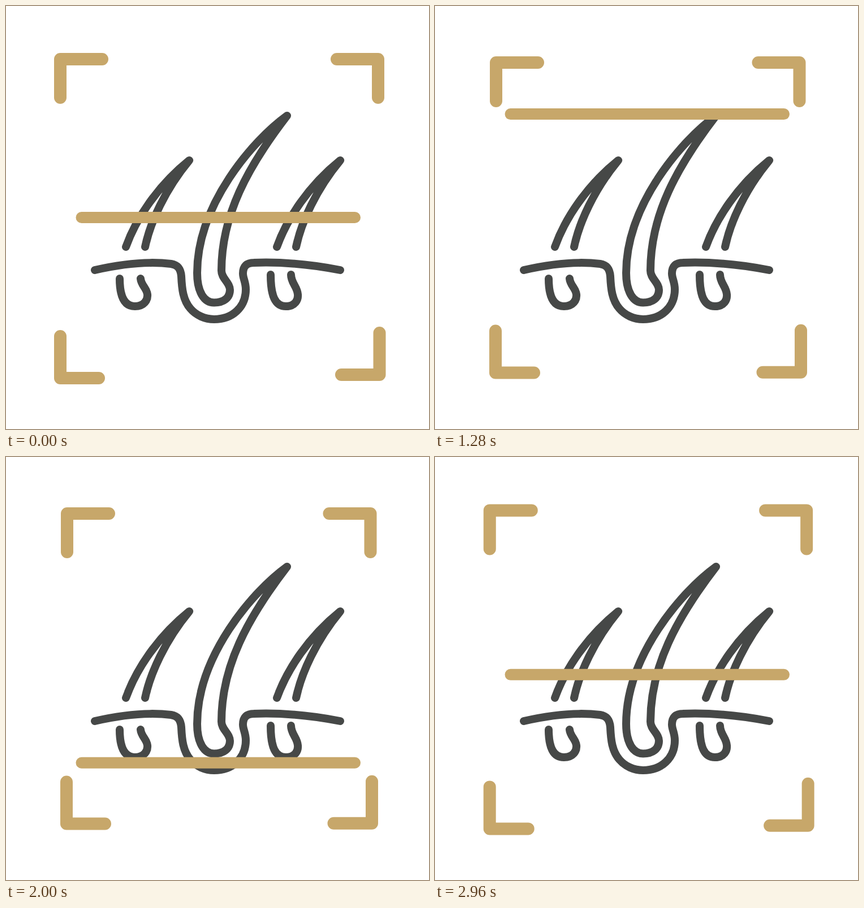
Animation of 748 by 748 pixels, one loop 3000 ms. Source, as an HTML page:

```html
<!DOCTYPE html>
<html lang="en">
<head>
<meta charset="utf-8">
<title>Hair follicle scan</title>
<style>
  html, body { margin: 0; width: 100%; height: 100%; overflow: hidden; background: #fff; }
  svg { display: block; width: 100%; height: 100%; }
  path { fill: none; stroke-linecap: round; stroke-linejoin: round; }
  #skin { stroke: #464847; stroke-width: 14; }
  #corners { stroke: #c7a76a; stroke-width: 22; }
  #bar { stroke: #c7a76a; stroke-width: 20; }
</style>
</head>
<body>
<svg viewBox="0 0 748 748">
  <g id="skin">
    <path id="shortHair" d="M212 426C230 376 268 318 324 273C281 325 255 383 246 426"/>
    <use href="#shortHair" x="267"/>
    <path d="M497 194C436 238 338 352 338 472C338 505 350 524.5 368 524.5C385 524.5 396 516 396 502C396 489 381 482 381 468C381 370 427 285 497 194"/>
    <path d="M201 482C201 513 209 531 228 531C244 531 251 520 250 510C249 499 239 494 238 482"/>
    <path d="M468 475C468 513 476 531 495 531C511 531 517 520 516 510C515 496 504 490 504 475"/>
    <path d="M157 467C205 456 250 451 292 456C304 458 309 465 310 478C311 500 313 520 326 535C336 547 352 554 368 554C400 554 424 533 424 501C424 488 419 482 419 473C419 460 426 454 438 454C490 452 545 458 591 467"/>
  </g>
  <g id="corners">
    <path d="M170 94H96V162"/>
    <path d="M585 94H658V162"/>
    <path d="M96 584V658H164"/>
    <path d="M660.5 578V652H593"/>
  </g>
  <path id="bar" d="M133.5 0H617"/>
</svg>
<script>
const LOOP = 3000, STEP = 40;
const bar = document.getElementById('bar');
const corners = document.querySelectorAll('#corners path');
const inward = [[12, 6], [-13.5, 6], [11, -9.5], [-13.5, -4.3]];

// [time, value] keys; the last ones run past the loop end and are cut off there
const barKeys = [[0, 374], [985, 189], [1242, 189], [2102, 555], [3110, 374]];
const cornerKeys = [[0, 0], [580, 1], [2490, 1], [3045, 0]];

function valueAt(keys, t) {
  const i = keys.findIndex(key => key[0] > t);
  const [t0, v0] = keys[i - 1], [t1, v1] = keys[i];
  const u = (t - t0) / (t1 - t0);
  return v0 + (v1 - v0) * u * u * (3 - 2 * u);
}

const start = performance.now();
function draw() {
  const elapsed = Math.max(0, performance.now() - start) % LOOP;
  const t = Math.floor(elapsed / STEP) * STEP;
  const squeeze = valueAt(cornerKeys, t);
  bar.setAttribute('transform', `translate(0 ${valueAt(barKeys, t)})`);
  corners.forEach((corner, i) => {
    const [x, y] = inward[i];
    corner.setAttribute('transform', `translate(${x * squeeze} ${y * squeeze})`);
  });
  requestAnimationFrame(draw);
}
draw();
</script>
</body>
</html>
```
